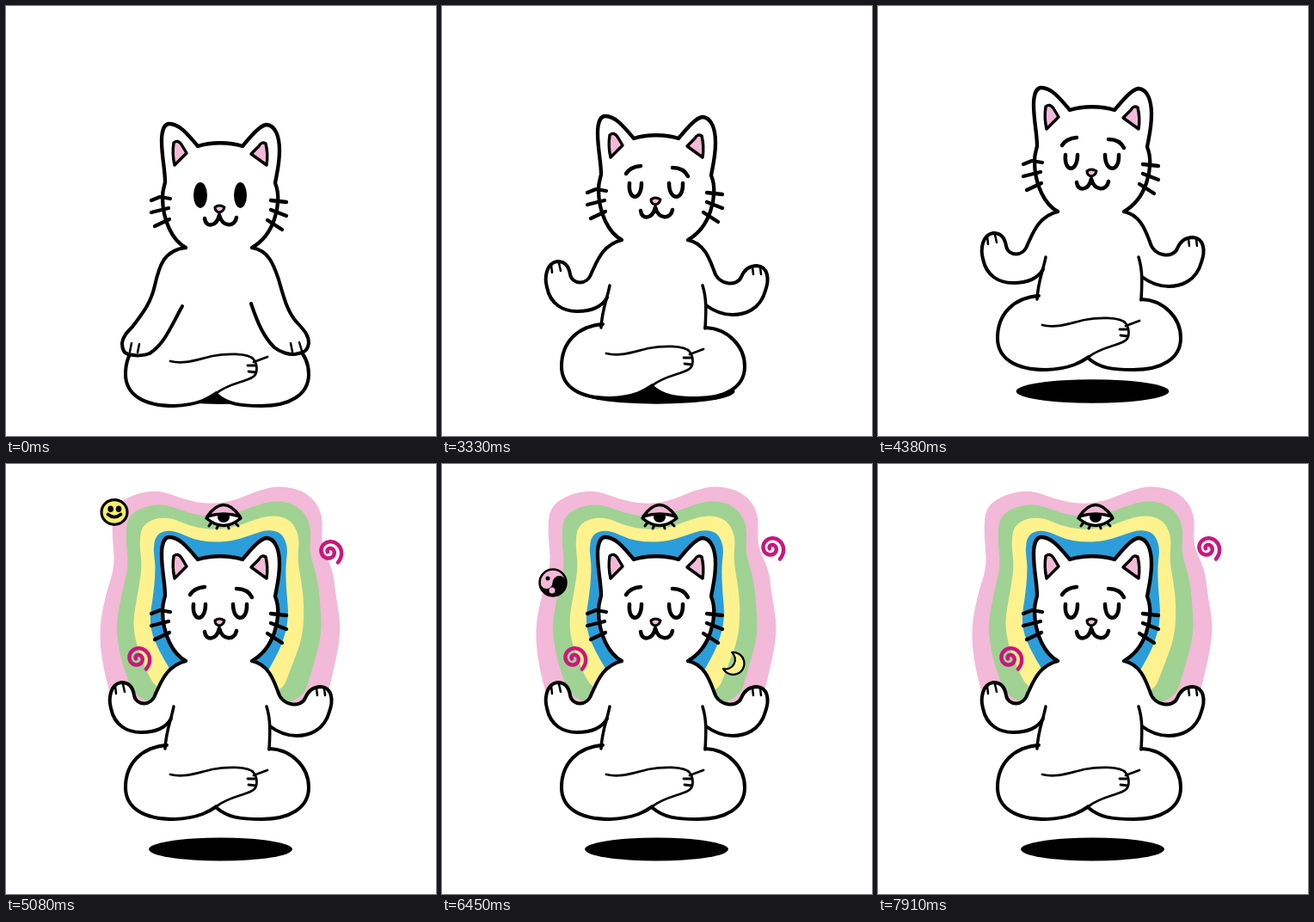
Animation, 500 px wide and 500 px high, one loop 8000 ms. Source, as an HTML page with a canvas:

```html
<!DOCTYPE html>
<html lang="en">
<head>
<meta charset="utf-8">
<title>Meditating cat</title>
<style>
html, body { margin: 0; width: 100%; height: 100%; overflow: hidden; background: #fff; }
canvas { display: block; width: 100vmin; height: 100vmin; }
</style>
</head>
<body>
<canvas width="500" height="500"></canvas>
<script>
const LOOP = 8000, TAU = Math.PI * 2;
const PINK = '#f3b9d8', BLUE = '#2b9dda', YELLOW = '#fdf28d', GREEN = '#a0d294',
      MAGENTA = '#c9177d', PURPLE = '#6f66bb';
const ctx = document.querySelector('canvas').getContext('2d');
ctx.lineCap = ctx.lineJoin = 'round';

const clamp = (v, lo, hi) => Math.max(lo, Math.min(hi, v));
const lerp = (a, b, k) => a + (b - a) * k;

function ink(path, width = 4, fill) {
  const p = typeof path === 'string' ? new Path2D(path) : path;
  if (fill) { ctx.fillStyle = fill; ctx.fill(p); }
  ctx.strokeStyle = '#000';
  ctx.lineWidth = width;
  if (width) ctx.stroke(p);
}

function oval(x, y, rx, ry = rx, fill = '#000', width = 0) {
  const p = new Path2D();
  p.ellipse(x, y, rx, ry, 0, 0, TAU);
  ink(p, width, fill);
}

// Blends two path strings that share the same commands.
function blend(a, b, k) {
  const to = b.match(/\d+/g);
  let i = 0;
  return a.replace(/\d+/g, n => lerp(+n, +to[i++], k));
}

// ---- Aura: rings between an inner and an outer outline ----
const OUTER = [130,300, 112,235, 108,190, 117,148, 127,118, 123,80, 125,50, 148,35, 178,30, 206,41, 235,47,
  265,43, 292,31, 318,25, 350,32, 369,57, 366,95, 380,122, 383,150, 390,190, 384,228, 366,300];
const INNER = [205,262, 176,215, 166,185, 172,148, 174,118, 171,100, 174,83, 186,77, 200,79, 216,87, 237,91,
  262,90, 284,83, 304,76, 321,80, 328,98, 325,118, 326,148, 329,178, 322,208, 308,235, 292,262];

function ring(k) {
  const v = INNER.map((n, i) => lerp(n, OUTER[i], k)), n = v.length;
  ctx.beginPath();
  for (let i = 0; i <= n; i += 2) {
    const x = v[i % n], y = v[(i + 1) % n];
    const mx = (x + v[(i + 2) % n]) / 2, my = (y + v[(i + 3) % n]) / 2;
    if (i) ctx.quadraticCurveTo(x, y, mx, my);
    else ctx.moveTo(mx, my);
  }
  ctx.fill();
}

function aura(t) {
  const step = Math.floor((t - 4390) / 185);
  const colors = [PINK, BLUE, YELLOW, GREEN];
  for (let i = Math.min(step, 3); i >= 0; i--) {
    ctx.fillStyle = colors[(i - step + 400) % 4];
    ring(i / 3);
  }
}

// ---- Floating symbols, each drawn around its own centre ----
function smiley() {
  oval(0, 0, 12, 11.5, '#f7ee6c', 2.5);
  oval(-3.5, -3, 2.6, 3);
  oval(4, -3, 2.6, 3);
  ink('M-6 2Q0 7 6 2', 3);
}

function star() {
  const p = new Path2D();
  for (let i = 0; i < 10; i++) {
    const a = i * TAU / 10 - 1.75, r = i % 2 ? 8 : 17;
    p.lineTo(r * Math.cos(a), r * Math.sin(a));
  }
  p.closePath();
  ink(p, 2, '#fdf28d');
}

function flower() {
  for (let i = 0; i < 6; i++) {
    const a = i * TAU / 6 + 0.3;
    oval(9.5 * Math.cos(a), 9.5 * Math.sin(a), 5.4, 5.4, PURPLE, 1.5);
  }
  oval(0, 0, 4.5, 4.5, YELLOW, 1.5);
}

function peace() {
  const p = new Path2D('M2-14L-2 14M0 0L-11 8M0 0L9 11');
  p.moveTo(15, 0);
  p.arc(0, 0, 15, 0, TAU);
  ctx.fillStyle = '#fff';
  ctx.fill(p);
  ctx.strokeStyle = BLUE;
  ctx.lineWidth = 3;
  ctx.stroke(p);
}

function yinYang() {
  oval(0, 0, 15.5, 15.5, PINK, 2.5);
  ink('M-15 0A7.5 7.5 0 0 0 0 0A7.5 7.5 0 0 1 15 0A15 15 0 0 1-15 0Z', 1, '#000');
  oval(-6, -5, 2.5);
  oval(-1, 9, 3.5, 3.5, PINK);
}

function moon() {
  ink('M-3-13A13 13 0 1 1-13 6A11 11 0 0 0-3-13Z', 2.2, '#fdf28d');
}

function spiral() {
  ctx.beginPath();
  for (let i = 0; i <= 60; i++) {
    const k = i / 60, a = 0.9 - k * 10.5, r = lerp(16, 2, k ** 0.8);
    ctx.lineTo(r * Math.cos(a), r * Math.sin(a));
  }
  ctx.strokeStyle = MAGENTA;
  ctx.lineWidth = 4.5;
  ctx.stroke();
}

function eye(open) {
  ink('M-20 2Q0-22 20 2Q0 19-20 2Z', 3.5, '#fff');
  if (open) {
    ink('M-14-8L-16-12M-5-11L-6-16M6-11L8-16M14-7L17-12', 3);
    oval(0, -1, 6.5, 7.5);
    oval(0, -1, 1.8, 2, '#fff');
  } else {
    oval(0, 1, 7, 6);
    ink('M-19 0Q0-27 19 0Q0-6-19 0Z', 3.5, PINK);
  }
  ink('M-14 7L-17 11M-6 10L-8 14M5 10L6 14M13 7L17 11', 3);
}

// [draw, x, y, visible spans]
const SYMBOLS = [
  [smiley, 126, 56, [[5080, 6030], [6660, 7600]]],
  [star, 106, 202, [[5250, 6250], [6850, 7830]]],
  [flower, 368, 175, [[5330, 6280], [6900, 7880]]],
  [peace, 352, 49, [[5420, 6450]]],
  [yinYang, 129, 138, [[5500, 6540]]],
  [moon, 340, 232, [[5590, 6630]]]
];

function at(x, y, draw, scale = 1) {
  ctx.save();
  ctx.translate(x, y);
  ctx.scale(scale, scale);
  draw();
  ctx.restore();
}

function symbols(t) {
  for (const [draw, x, y, spans] of SYMBOLS) {
    const span = spans.find(([on, off]) => t >= on && t < off);
    if (span) at(x, y, draw, t - span[0] < 90 ? 1.25 : 1);
  }
  if (t < 5080) return;
  const odd = period => Math.floor((t - 5080) / period) % 2;
  at(253, 61, () => eye(odd(340)));
  at(153 + 7 * odd(170), 226 - 4 * odd(170), spiral);
  at(376 + 7 * odd(250), 102 - 4 * odd(250), spiral);
}

// ---- Cat ----
const ARMS = [
  ['M209 281C183 284 178 303 173 325C168 348 155 362 147 373C141 379 136 384 135 392C135 398 136 404 143 405C150 407 160 407 167 404C185 392 192 372 205 349',
   'M209 281C186 287 180 307 174 319C169 335 151 333 149 321C147 308 139 306 134 306C121 308 119 325 122 336C126 356 141 364 157 364C176 364 187 357 192 348'],
  ['M286 281C305 284 311 300 317 318C322 335 326 352 335 364C343 374 352 380 352 392C351 400 347 403 340 404C330 407 318 402 312 397C300 385 293 370 285 346',
   'M286 281C305 285 311 303 316 316C321 335 344 335 348 324C353 312 361 311 366 311C379 312 381 326 376 340C370 362 352 368 338 368C325 368 315 363 307 357']
];
const FINGERS = ['M144 402L146 392M153 403L155 393M333 402L331 392M344 401L341 391',
                 'M128 319L127 310M138 317L136 308M362 321L361 313M371 321L370 313'];

function body(raise) {
  ink('M209 279L286 279L312 322L306 400L187 400L182 322Z', 0, '#fff');
  ink('M306 383C333 384 352 405 352 428C352 452 330 465 297 465C272 465 258 463 245 452', 4, '#fff');
  ink('M187 379C158 381 139 400 139 428C139 452 160 465 195 465C225 464 240 454 250 447C262 439 275 438 286 432C294 428 292 416 288 411C282 403 255 404 240 407', 0, '#fff');
  ink('M187 379C158 381 139 400 139 428C139 452 160 465 195 465C225 464 238 455 245 450', 4);
  ink('M245 450C259 439 275 438 286 432C294 428 292 416 288 411C282 403 255 404 240 407C222 411 208 417 191 413M304 408L288 414M281 418L291 418M282 425L291 426', 2.8);
  for (const [down, up] of ARMS) ink(blend(down, up, raise), 4, '#fff');
  if (raise > 0) ink('M195 334C192 350 186 362 185 383M303 334C308 350 307 365 306 384', 3.5);
  ink(blend(...FINGERS, raise), 2.5);
}

function head(closed) {
  ink('M209 281C194 273 182 250 182 222C182 214 184 210 185 205C185 190 181 175 181 157C181 143 185 137 190 137C202 137 212 150 223 163C238 158 260 158 275 163C285 151 295 139 303 138C314 139 318 153 318 168C318 184 315 194 313 206C318 218 317 234 312 248C307 263 298 274 286 281', 4.3, '#fff');
  ink('M195 159Q200 155 204 161L210 171L196 185Q193 172 195 159Z', 3.4, PINK);
  ink('M302 160Q297 157 294 163L285 172L303 185Q305 172 302 160Z', 3.4, PINK);
  ink('M169 226L179 222L191 224M169 240L189 235M173 256L190 248M308 226L326 228M308 237L326 244M304 249L321 260', 4.3);
  if (closed) {
    ink('M218 215C216 236 232 236 232 215M264 215C264 236 281 236 280 215', 4.5);
    ink('M214 204Q219 196 231 195M268 197Q281 197 286 207', 4.5);
  } else {
    oval(226, 220, 8, 15);
    oval(272.5, 220, 7.5, 15);
  }
  ink('M231 247C232 258 245 257 248 243C252 258 266 257 268 246', 4.5);
  ink('M243 234Q248 230 254 234Q253 239 248 240Q243 239 243 234Z', 3, PINK);
}

function frame(now) {
  const t = now % LOOP;
  const climb = from => clamp(Math.floor((t - from) / 30) + 1, 0, 26);
  const rise = climb(3090) + climb(3930);
  const raise = t < 2060 ? 0 : t < 2160 ? 0.5 : 1;
  const closed = t >= 430 && t < 560 || t >= 1430;

  ctx.fillStyle = '#fff';
  ctx.fillRect(0, 0, 500, 500);
  oval(249.5, 448, Math.min(91, 112 - 0.55 * rise), 15 - 0.03 * rise);
  aura(t);
  symbols(t);
  ctx.save();
  ctx.translate(0, -rise);
  body(raise);
  head(closed);
  ctx.restore();
  requestAnimationFrame(frame);
}
requestAnimationFrame(frame);
</script>
</body>
</html>
```
